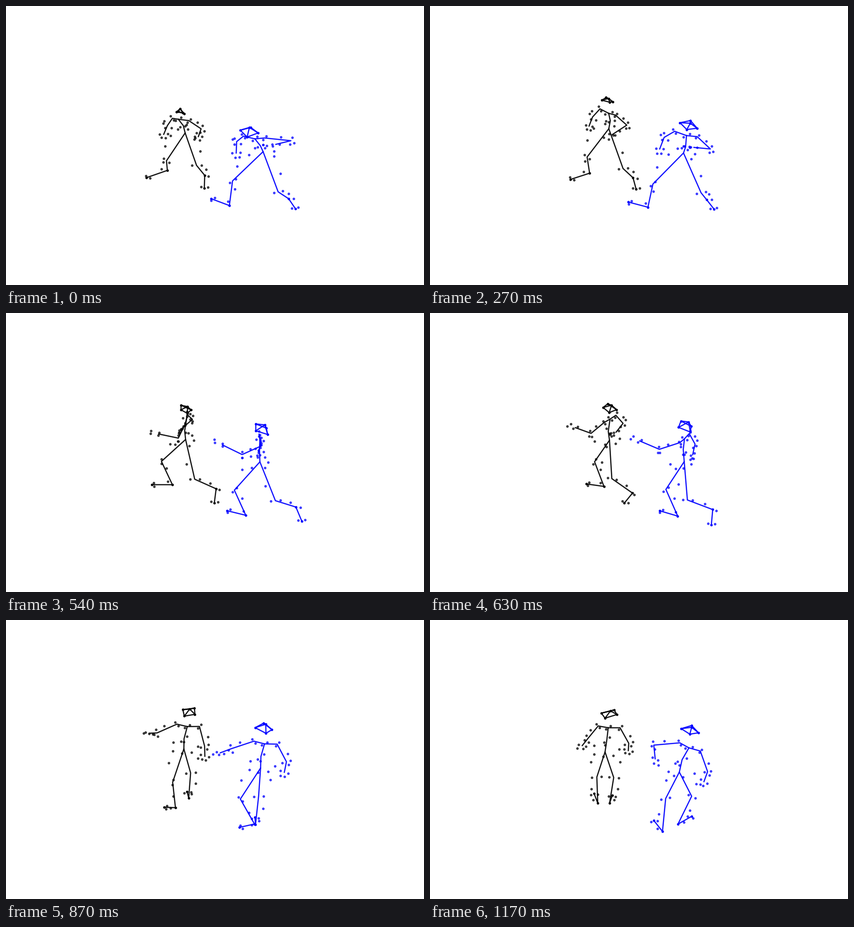
Recreate the animation shown at these times as a matplotlib script. Size 917x611 px, loop 1200 ms.

```python
import numpy as np
import matplotlib.pyplot as plt
from matplotlib.animation import FuncAnimation

W, H, DPI = 917, 611, 64
PT = 72 / DPI                      # points per pixel
FRAMES, STEP = 40, 30
KEYS = np.array([0, 5, 13, 18, 25, 33, 39])
TILT = 0.5                         # foreshortening of the ground plane
UP = np.array([0, -1])

CHAINS = [
    "wrist_a elbow_a shoulder_a neck shoulder_b elbow_b wrist_b",
    "neck spine pelvis",
    "toe_a ankle_a knee_a pelvis knee_b ankle_b toe_b",
    "head1 head2 head3 head4 head1 crown head3",
    "head2 crown head4",
]
SOLID = "head1 head2 head3 head4 crown ankle_a ankle_b toe_a toe_b".split()

# Markers: start joint, end joint, share along the bone, then the
# offset in pixels to the side, forward and up.
TORSO = [
    ("neck", "neck", 0, -4, 8, 0), ("neck", "neck", 0, 4, -8, 1),
    ("spine", "spine", 0, -5, 9, 1), ("spine", "spine", 0, 5, -9, -2),
    ("pelvis", "pelvis", 0, 28, 20, 2), ("pelvis", "pelvis", 0, -28, 18, -1),
    ("pelvis", "pelvis", 0, 23, -10, -2), ("pelvis", "pelvis", 0, -20, -12, 0),
    ("pelvis", "pelvis", 0, 1, -18, -1), ("pelvis", "pelvis", 0, 0, 0, 15),
    ("pelvis", "knee_a", 0.5, -22, 10, 3), ("pelvis", "knee_b", 0.5, 23, 6, 1),
]
ARMS = [
    ("shoulder_a", "elbow_a", 0, -4, 0, 4), ("shoulder_a", "elbow_a", 0, 3, 0, -4),
    ("shoulder_a", "elbow_a", 0.5, -13, 0, 0),
    ("elbow_a", "wrist_a", 0, -9, 0, 4), ("elbow_a", "wrist_a", 0, -5, 0, -6),
    ("elbow_a", "wrist_a", 0, 9, 0, -4),
    ("elbow_a", "wrist_a", 1, 9, 0, 2), ("elbow_a", "wrist_a", 1, -9, 0, -1),
    ("elbow_a", "wrist_a", 1.35, 7, 0, 0), ("elbow_a", "wrist_a", 1.4, -2, 0, 0),
    ("shoulder_b", "elbow_b", 0, 4, 0, 4), ("shoulder_b", "elbow_b", 0, -3, 0, -4),
    ("shoulder_b", "elbow_b", 0.55, 4, 0, 6),
    ("elbow_b", "wrist_b", 0, 3, 0, 7), ("elbow_b", "wrist_b", 0, 7, 0, -4),
    ("elbow_b", "wrist_b", 0, -2, 0, -8),
    ("elbow_b", "wrist_b", 1, 8, 0, 1), ("elbow_b", "wrist_b", 1, -8, 0, -1),
    ("elbow_b", "wrist_b", 1.4, 6, 0, 0), ("elbow_b", "wrist_b", 1.4, -7, 0, 0),
]


def leg_markers(side, out):
    knee, ankle, toe = (f"{j}_{side}" for j in ("knee", "ankle", "toe"))
    return [
        (knee, ankle, 0, 11 * out, 0, 0), (knee, ankle, 0, -10 * out, 0, 0),
        (knee, ankle, 0.45, 13 * out, 0, 1),
        (ankle, toe, 0, 8 * out, 10, 3),
        (toe, toe, 0, 8 * out, -4, 0), (toe, toe, 0, -7 * out, -5, 0),
    ]


def spline(values):
    """Smooth path through the key values, sampled at every frame."""
    v = np.array(values, float)
    slope = np.gradient(v, KEYS)
    f = np.arange(FRAMES)
    i = np.clip(np.searchsorted(KEYS, f, side="right") - 1, 0, len(KEYS) - 2)
    span = KEYS[i + 1] - KEYS[i]
    u = (f - KEYS[i]) / span
    return ((1 + 2 * u) * (1 - u) ** 2 * v[i] + u * (1 - u) ** 2 * span * slope[i]
            + u * u * (3 - 2 * u) * v[i + 1] + u * u * (u - 1) * span * slope[i + 1])


def unit(vec):
    """Direction on the ground plane of a vector seen on screen."""
    flat = vec / [1, TILT]
    return flat / np.hypot(*flat)


def side_axes(side):
    x, y = unit(side)
    return np.array([x, TILT * y]), np.array([-y, TILT * x])


def foot_axes(forward):
    x, y = unit(forward)
    return np.array([y, -TILT * x]), np.array([x, TILT * y])


class Walker:
    def __init__(self, ax, color):
        self.paths = {}
        self.lines = [ax.plot([], [], color=color, lw=2.6 * PT, alpha=0.92)[0]
                      for _ in CHAINS]
        dot = dict(ls="", marker="o", color=color, ms=4.3 * PT, mew=1.3 * PT)
        self.dots = ax.plot([], [], alpha=0.7, **dot)[0]
        self.solid = ax.plot([], [], alpha=0.9, **dot)[0]

    def path(self, joint, xs, ys):
        self.paths[joint] = np.column_stack([spline(xs), spline(ys)])

    def markers(self, pose):
        groups = [(TORSO + ARMS, side_axes(pose["shoulder_b"] - pose["shoulder_a"]))]
        for side, out in (("a", -1), ("b", 1)):
            axes = foot_axes(pose["toe_" + side] - pose["ankle_" + side])
            groups.append((leg_markers(side, out), axes))
        return np.array([
            pose[p] + u * (pose[q] - pose[p]) + s * lat + f * fwd + h * UP
            for table, (lat, fwd) in groups
            for p, q, u, s, f, h in table])

    def draw(self, frame):
        pose = {joint: p[frame] for joint, p in self.paths.items()}
        for line, chain in zip(self.lines, CHAINS):
            line.set_data(*np.array([pose[j] for j in chain.split()]).T)
        self.solid.set_data(*np.array([pose[j] for j in SOLID]).T)
        self.dots.set_data(*self.markers(pose).T)
        return [*self.lines, self.dots, self.solid]


fig = plt.figure(figsize=(W / DPI, H / DPI), dpi=DPI, facecolor="white")
ax = fig.add_axes([0, 0, 1, 1])
ax.set(xlim=(0, W), ylim=(H, 0))
ax.axis("off")

black = Walker(ax, "black")
add = black.path
add("neck", [378, 386, 396, 396, 394, 400, 391], [248, 236, 236, 232, 234, 233, 236])
add("spine", [389, 392, 397, 392, 391, 390, 388], [262, 251, 255, 258, 260, 260, 262])
add("pelvis", [393, 390, 395, 394, 393, 387, 384], [278, 266, 275, 277, 281, 284, 289])
add("shoulder_a", [365, 364, 385, 397, 421, 423, 417], [246, 232, 222, 222, 228, 237, 236])
add("elbow_a", [354, 346, 377, 409, 436, 432, 436], [262, 247, 241, 233, 260, 285, 270])
add("wrist_a", [346, 342, 363, 388, 432, 434, 435], [281, 265, 262, 251, 282, 306, 286])
add("shoulder_b", [401, 406, 404, 393, 370, 381, 369], [251, 237, 244, 243, 234, 225, 232])
add("elbow_b", [428, 441, 411, 378, 327, 344, 346], [269, 248, 278, 274, 249, 251, 260])
add("wrist_b", [422, 423, 368, 335, 306, 328, 334], [286, 269, 292, 265, 240, 262, 275])
add("knee_a", [352, 350, 340, 341, 393, 408, 403], [339, 330, 332, 325, 330, 340, 345])
add("ankle_a", [354, 357, 347, 365, 401, 395, 394], [360, 362, 371, 376, 385, 394, 401])
add("toe_a", [308, 317, 302, 320, 377, 407, 400], [376, 377, 381, 376, 374, 379, 384])
add("knee_b", [418, 420, 424, 414, 377, 361, 366], [349, 351, 361, 364, 359, 351, 344])
add("ankle_b", [436, 437, 455, 461, 410, 346, 368], [371, 375, 378, 385, 407, 410, 401])
add("toe_b", [435, 439, 463, 457, 377, 335, 360], [399, 401, 404, 416, 412, 404, 380])
add("head1", [374, 371, 384, 384, 401, 420, 404], [232, 216, 201, 202, 194, 194, 197])
add("head2", [378, 378, 397, 406, 412, 415, 410], [231, 211, 198, 212, 207, 207, 207])
add("head3", [391, 397, 403, 398, 388, 394, 384], [236, 214, 213, 220, 213, 210, 215])
add("head4", [388, 391, 394, 384, 378, 395, 376], [234, 218, 208, 212, 198, 198, 204])
add("crown", [382, 386, 397, 398, 399, 405, 396], [225, 205, 205, 205, 197, 195, 199])

blue = Walker(ax, "blue")
add = blue.path
add("neck", [546, 557, 564, 557, 563, 570, 568], [291, 283, 285, 279, 272, 273, 280])
add("spine", [558, 558, 562, 556, 557, 560, 553], [306, 304, 311, 300, 300, 299, 306])
add("pelvis", [564, 555, 559, 557, 559, 556, 547], [319, 321, 323, 326, 324, 326, 333])
add("shoulder_a", [521, 532, 542, 555, 587, 597, 593], [285, 277, 272, 265, 266, 279, 287])
add("elbow_a", [506, 507, 528, 560, 606, 616, 609], [297, 294, 282, 281, 299, 321, 332])
add("wrist_a", [505, 500, 518, 554, 601, 611, 601], [322, 321, 305, 304, 322, 344, 354])
add("shoulder_b", [567, 581, 582, 558, 541, 549, 548], [289, 281, 293, 292, 271, 264, 269])
add("elbow_b", [625, 637, 576, 518, 497, 495, 491], [295, 288, 334, 310, 287, 279, 274])
add("wrist_b", [592, 603, 537, 475, 458, 486, 494], [303, 296, 318, 289, 278, 305, 304])
add("knee_a", [497, 495, 487, 501, 541, 563, 574], [383, 391, 387, 388, 384, 389, 386])
add("ankle_a", [490, 475, 493, 526, 558, 534, 544], [437, 440, 441, 443, 447, 448, 447])
add("toe_a", [450, 432, 451, 485, 526, 562, 574], [422, 429, 429, 433, 432, 432, 430])
add("knee_b", [597, 592, 597, 591, 525, 514, 517], [407, 410, 408, 411, 404, 383, 391])
add("ankle_b", [620, 602, 620, 636, 584, 514, 510], [422, 424, 424, 425, 440, 453, 463])
add("toe_b", [635, 618, 636, 649, 557, 483, 491], [444, 446, 446, 456, 469, 438, 439])
add("head1", [514, 539, 551, 548, 557, 572, 574], [272, 260, 252, 243, 229, 226, 231])
add("head2", [537, 562, 574, 571, 578, 588, 589], [266, 254, 251, 252, 242, 241, 247])
add("head3", [553, 578, 585, 574, 570, 571, 570], [278, 267, 270, 266, 253, 246, 250])
add("head4", [529, 557, 560, 548, 545, 549, 551], [287, 274, 268, 258, 241, 234, 238])
add("crown", [534, 561, 573, 568, 568, 572, 574], [266, 256, 257, 245, 232, 228, 235])


def update(frame):
    return black.draw(frame) + blue.draw(frame)


anim = FuncAnimation(fig, update, frames=FRAMES, interval=STEP, repeat=True,
                     repeat_delay=0)
plt.show()
```
